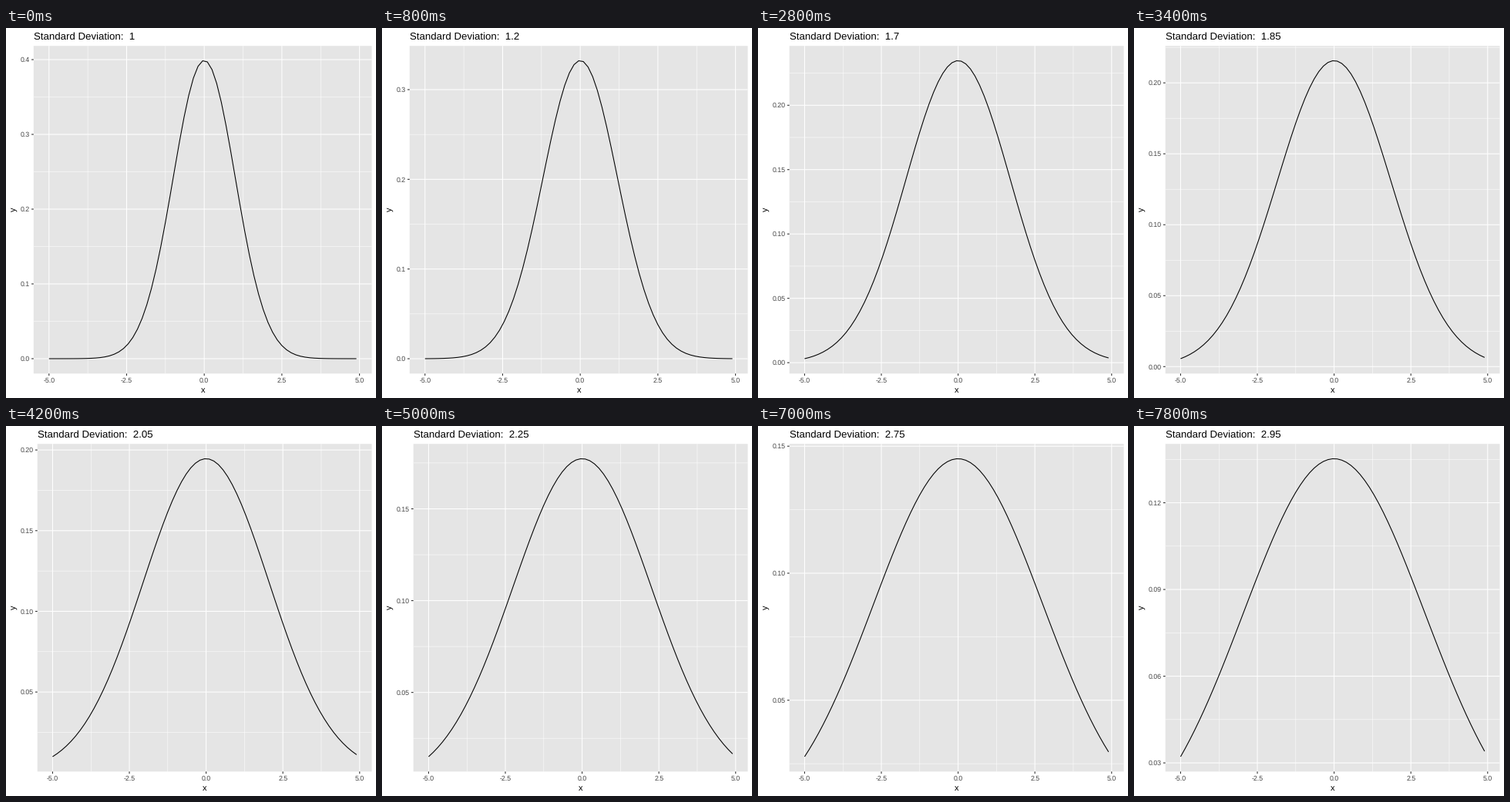
Animation, 480 px wide and 480 px high, one loop 8000 ms. Source, as a matplotlib script:

```python
import math

import matplotlib.pyplot as plt
import numpy as np
from matplotlib.animation import FuncAnimation
from matplotlib.patches import Rectangle

plt.rcParams["font.family"] = "Liberation Sans"
plt.rcParams["text.hinting"] = "none"

SIZE, DPI = 480, 72          # at 72 dpi one point is one pixel
FRAMES, INTERVAL = 40, 200
TOP, BOTTOM, RIGHT = 23.2, 448.3, 474.5
THICK, THIN = 1.07, 0.53
TICK, GAP = 2.75, 4.95
PANEL, TICK_COLOR, LABEL_COLOR = "#e5e5e5", "#2d2d2d", "#444444"
NICE = [1, 5, 2, 2.5, 4, 3]

X = -5 + 0.15 * np.arange(67)


def score(lo, hi, first, last, step, k, j, rank, target=5):
    """Rate a set of tick labels by simplicity, coverage and density."""
    rest = first % step
    has_zero = min(rest, step - rest) < 1e-10 and first <= 0 <= last
    simple = 1 - rank / (len(NICE) - 1) - j + has_zero
    cover = 1 - 0.5 * ((hi - last) ** 2 + (lo - first) ** 2) / (0.1 * (hi - lo)) ** 2
    r = (k - 1) / (last - first)
    rt = (target - 1) / (max(last, hi) - min(first, lo))
    dense = 2 - max(r / rt, rt / r)
    return 0.25 * simple + 0.2 * cover + 0.5 * dense + 0.05


def find_ticks(lo, hi):
    """Extended Wilkinson labelling; returns tick values and their step."""
    best, pick = -99, None
    for j in (1, 2):
        for rank, q in enumerate(NICE):
            for k in range(2, 11):
                z0 = math.ceil(math.log10((hi - lo) / (k + 1) / j / q))
                for z in (z0, z0 + 1):
                    step = j * q * 10.0 ** z
                    start = (math.floor(hi / step) - (k - 1)) * j
                    stop = math.ceil(lo / step) * j
                    for s in range(start, stop + 1):
                        first = s * step / j
                        last = first + step * (k - 1)
                        value = score(lo, hi, first, last, step, k, j, rank)
                        if value > best + 1e-12:
                            best, pick = value, (first, step, k)
    first, step, k = pick
    ticks = first + step * np.arange(k)
    return ticks[(ticks >= lo) & (ticks <= hi)], step


def expand(values):
    pad = 0.05 * (values.max() - values.min())
    return values.min() - pad, values.max() + pad


def mid_ticks(ticks, step, lo, hi):
    mids = np.append(ticks - step / 2, ticks[-1] + step / 2)
    return mids[(mids > lo) & (mids < hi)]


def labels(ticks):
    digits = 0
    while np.abs(np.round(ticks, digits) - ticks).max() > 1e-9:
        digits += 1
    return [f"{t + 0.0 if abs(t) > 1e-9 else 0:.{digits}f}" for t in ticks]


x_lo, x_hi = expand(X)
x_ticks, x_step = find_ticks(x_lo, x_hi)

fig = plt.figure(figsize=(SIZE / DPI, SIZE / DPI), dpi=DPI, facecolor="white")
ax = fig.add_axes([0, 0, 1, 1])


def line(x, y, color="white", width=THICK):
    ax.plot(x, y, color=color, lw=width, solid_capstyle="butt",
            solid_joinstyle="round", snap=False)


def text(x, y, s, size, color="black", ha="center", **kw):
    ax.text(x, y, s, size=size, color=color, ha=ha, va="baseline", **kw)


def draw(i):
    ax.clear()
    ax.set(xlim=(0, SIZE), ylim=(SIZE, 0))
    ax.axis("off")

    sd = 1 + 0.05 * i
    y = np.exp(-0.5 * (X / sd) ** 2) / (sd * math.sqrt(2 * math.pi))
    y_lo, y_hi = expand(y)
    y_ticks, y_step = find_ticks(y_lo, y_hi)
    y_names = labels(y_ticks)

    # the panel starts after the widest tick label
    left = 18.65 + 8.8 * (0.556 * (len(y_names[0]) - 1) + 0.278) + GAP

    def px(v):
        return left + (v - x_lo) / (x_hi - x_lo) * (RIGHT - left)

    def py(v):
        return BOTTOM - (v - y_lo) / (y_hi - y_lo) * (BOTTOM - TOP)

    ax.add_patch(Rectangle((left, TOP), RIGHT - left, BOTTOM - TOP,
                           fc=PANEL, lw=0, snap=False))
    grids = ((mid_ticks(x_ticks, x_step, x_lo, x_hi),
              mid_ticks(y_ticks, y_step, y_lo, y_hi), THIN),
             (x_ticks, y_ticks, THICK))
    for xs, ys, width in grids:
        for v in py(ys):
            line([left, RIGHT], [v, v], width=width)
        for v in px(xs):
            line([v, v], [TOP, BOTTOM], width=width)

    line(px(X), py(y), "black")

    for v, name in zip(px(x_ticks), labels(x_ticks)):
        line([v, v], [BOTTOM, BOTTOM + TICK], TICK_COLOR)
        text(v, 460, name, 8.8, LABEL_COLOR)
    for v, name in zip(py(y_ticks), y_names):
        line([left - TICK, left], [v, v], TICK_COLOR)
        text(left - GAP, v + 3.15, name, 8.8, LABEL_COLOR, ha="right")

    text(left, 15, f"Standard Deviation:  {sd:g}", 13.2, ha="left")
    text((left + RIGHT) / 2, 473, "x", 11)
    text(13.2, (TOP + BOTTOM) / 2, "y", 11, rotation=90, rotation_mode="anchor")
    return []


anim = FuncAnimation(fig, draw, frames=FRAMES, interval=INTERVAL,
                     init_func=lambda: draw(0), repeat=True, repeat_delay=0)
plt.show()
```
